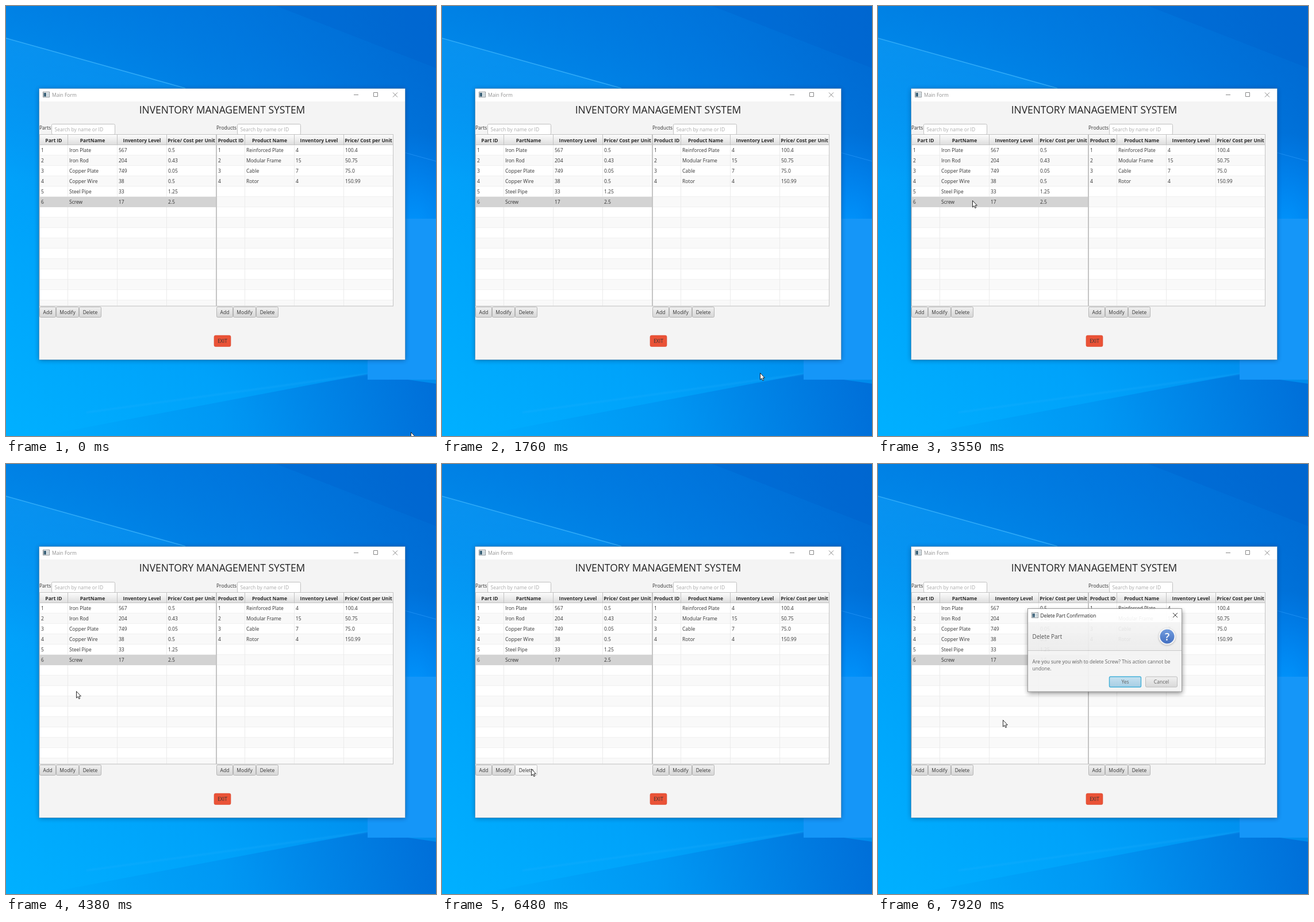
Write an HTML page that moves like this. It is 748 by 748 pixels and loops after 8000 ms.

```html
<!DOCTYPE html>
<html lang="en">
<head>
<meta charset="utf-8">
<title>Inventory</title>
<style>
html, body { margin: 0; width: 100%; height: 100%; overflow: hidden; background: #0090f0; }
svg { display: block; width: 100vw; height: 100vh; }
text { font: 8.5px "Open Sans", "Noto Sans", sans-serif; fill: #333; white-space: pre; }
.head { font-weight: 700; fill: #2c2c2c; }
.mid { text-anchor: middle; }
.title { font-size: 17.43px; fill: #222; }
.hint { fill: #a9a9a9; }
.body { fill: #555; }
</style>
</head>
<body>
<svg id="stage" viewBox="0 0 748 748" xmlns="http://www.w3.org/2000/svg"></svg>
<script>
const LOOP = 8000;
const attrs = o => Object.entries(o).map(([k, v]) => ` ${k}="${v}"`).join('');
const rect = (x, y, w, h, fill, more = {}) =>
  `<rect${attrs({ x, y, width: w, height: h, fill, ...more })}/>`;
const path = (d, stroke, more = {}) =>
  `<path${attrs({ d, fill: 'none', stroke, ...more })}/>`;
const text = (x, y, s, cls = '', more = {}) =>
  `<text${attrs({ x, y, class: cls, ...more })}>${s}</text>`;
const grad = (id, stops, x1 = 0, y1 = 0, x2 = 0, y2 = 1) =>
  `<linearGradient${attrs({ id, x1, y1, x2, y2 })}>` +
  stops.map(([o, c, a = 1]) => `<stop offset="${o}" stop-color="${c}" stop-opacity="${a}"/>`).join('') +
  '</linearGradient>';
const blur = (id, dev) =>
  `<filter id="${id}" x="-20%" y="-20%" width="140%" height="140%"><feGaussianBlur stdDeviation="${dev}"/></filter>`;

const defs = '<defs>' +
  grad('sky', [[0, '#00b0ff'], [.3, '#00a2fa'], [.52, '#008fee'], [.75, '#0079e0'], [1, '#005fc8']], 0, 1, 1, 0) +
  grad('top', [[0, '#0074dc', .55], [1, '#0074dc', 0]]) +
  grad('low', [[0, '#0070dc', 0], [.45, '#0078e0', .25], [1, '#0068d4', .8]], 0, 0, 1, 0) +
  grad('ray', [[0, '#18a8ff', .35], [1, '#0a98f8', 0]]) +
  grad('header', [[0, '#fcfcfc'], [1, '#dcdcdc']]) +
  grad('button', [[0, '#f0f0f0'], [1, '#d6d6d6']]) +
  grad('hover', [[0, '#fbfbfb'], [1, '#eeeeee']]) +
  grad('press', [[0, '#d2d2d2'], [1, '#c2c2c2']]) +
  grad('yes', [[0, '#c2e0f0'], [1, '#a0cae2']]) +
  grad('panel', [[0, '#f5f5f5'], [1, '#ececec']]) +
  grad('disc', [[0, '#6694dc'], [1, '#3565bd']]) +
  '<radialGradient id="glow"><stop offset="0" stop-color="#0098ff" stop-opacity=".9"/>' +
  '<stop offset="1" stop-color="#0088ff" stop-opacity="0"/></radialGradient>' +
  blur('soft', 4) + blur('wide', 6.5) + blur('edge', 1.5) + '</defs>';

function desktop() {
  return rect(0, 0, 748, 748, 'url(#sky)') +
    rect(0, 0, 748, 300, 'url(#top)') +
    path('M470 0L748 108V0Z', 'none', { fill: '#0058c4', 'fill-opacity': .22 }) +
    path('M0 56L312 143V420H0Z', 'none', { fill: 'url(#ray)' }) +
    path('M0 56L312 143', '#48bcff', { 'stroke-width': 1.6, opacity: .65 }) +
    '<ellipse cx="710" cy="390" rx="120" ry="170" fill="url(#glow)"/>' +
    path('M690 254L748 270', '#38a4ff', { opacity: .5 }) +
    path('M630 640L748 657V748H60Z', 'none', { fill: 'url(#low)' }) +
    path('M630 640L140 707', '#2cb4ff', { 'stroke-width': 2, opacity: .35, filter: 'url(#edge)' }) +
    rect(629, 370, 280, 280, '#1596f8');
}

// Small window symbol in a title bar
function appIcon(x, y) {
  return rect(x + .5, y + .5, 11, 9, '#fff', { stroke: '#8c9499' }) +
    rect(x + 1.5, y + 2, 4.5, 6.5, '#3c6278') +
    rect(x + 7, y + 2, 3.5, 6.5, '#c8d4da');
}

const cross = (x, y) => `M${x - 4} ${y - 4}l8 8m0 -8l-8 8`;

function button(x, y, w, h, label, id = '') {
  return rect(x + .5, y + .5, w - 1, h - 1, 'url(#button)', { id, stroke: '#b4b4b4', rx: 2 }) +
    text(x + w / 2, y + h / 2 + 3.2, label, 'mid');
}

function table(x, heads, rows, picked) {
  const cols = [0, 49, 135, 221, 307];
  const top = 242, end = 522;
  let s = rect(x, 224, 308, end - 224, '#fff');
  for (let i = 0; top + i * 18 < end; i++) {
    const y = top + i * 18, h = Math.min(18, end - y);
    s += rect(x, y, 307, h, i === picked ? '#d3d3d3' : i % 2 ? '#f9f9f9' : '#fff');
    if (i !== picked) s += rect(x, y + h - 1, 307, 1, '#f0f0f0');
  }
  s += rect(x, 224, 308, 18, 'url(#header)') + rect(x, 241, 308, 1, '#c6c6c6');
  heads.forEach((label, i) => {
    const c = x + cols[i + 1];
    s += rect(c, 242, 1, end - 242, '#ebebeb') + rect(c, 224, 1, 18, '#c2c2c2');
    s += text(x + (cols[i] + cols[i + 1]) / 2 + .5, 237, label, 'head mid');
  });
  if (picked !== undefined) s += rect(x, top + picked * 18, 307, 18, '#d3d3d3');
  rows.forEach((row, r) => row.forEach((cell, i) => {
    s += text(x + cols[i] + 3, top + 12.3 + r * 18, cell);
  }));
  return s + rect(x + .5, 223.5, 307, 298.5, 'none', { stroke: '#c4c4c4' });
}

function pane(x, label, fieldX, heads, rows, picked, delId) {
  return text(x, 215, label) +
    rect(fieldX + .5, 205.5, 110, 18, '#fff', { stroke: '#c0c0c0', rx: 2 }) +
    text(fieldX + 5.5, 217.8, 'Search by name or ID', 'hint') +
    table(x, heads, rows, picked) +
    button(x, 523, 29, 19, 'Add') + button(x + 29, 523, 40, 19, 'Modify') +
    button(x + 69, 523, 39, 19, 'Delete', delId);
}

function mainWindow() {
  const level = 'Inventory Level', price = 'Price/ Cost per Unit';
  const parts = [
    [1, 'Iron Plate', 567, '0.5'], [2, 'Iron Rod', 204, '0.43'],
    [3, 'Copper Plate', 749, '0.05'], [4, 'Copper Wire', 38, '0.5'],
    [5, 'Steel Pipe', 33, '1.25'], [6, 'Screw', 17, '2.5']
  ];
  const products = [
    [1, 'Reinforced Plate', 4, '100.4'], [2, 'Modular Frame', 15, '50.75'],
    [3, 'Cable', 7, '75.0'], [4, 'Rotor', 4, '150.99']
  ];
  return rect(58, 145, 636, 471, '#001c40', { id: 'shade', filter: 'url(#soft)', opacity: .45 }) +
    rect(60, 148, 638, 474, '#001c40', { id: 'deep', filter: 'url(#wide)', opacity: .5 }) +
    rect(57.5, 143.5, 637, 472, '#f4f4f4', { stroke: '#3a76a8', 'stroke-opacity': .5 }) +
    rect(58, 144, 636, 22, '#fff') + appIcon(64, 149) +
    text(80, 157.7, 'Main Form', '', { id: 'caption' }) +
    path('M605 154.5h8M639.5 150.5h7v7h-7z' + cross(677, 154.5), '#888', { id: 'controls' }) +
    text(376, 187, 'INVENTORY MANAGEMENT SYSTEM', 'title mid') +
    pane(58, 'Parts', 79, ['Part ID', 'PartName', level, price], parts, 5, 'del') +
    pane(366, 'Products', 402, ['Product ID', 'Product Name', level, price], products) +
    rect(362, 573, 29, 19.5, '#ea5337', { rx: 2.5, stroke: '#d8492f', 'stroke-width': .6 }) +
    text(376.5, 585.9, 'EXIT', 'mid');
}

function dialog() {
  return '<g id="dialog">' +
    rect(261, 255, 268, 144, '#000', { filter: 'url(#soft)', opacity: .5 }) +
    rect(260.5, 251.5, 268, 144.5, '#f4f4f4', { stroke: '#929292' }) +
    rect(261, 252, 267, 23, '#fff') + appIcon(267, 258) +
    text(282.5, 266.7, 'Delete Part Confirmation', '', { style: 'font-size:8.35px;fill:#111' }) +
    path(cross(517, 263), '#222') +
    rect(261, 275, 267, 49, 'url(#panel)') + rect(261, 324, 267, 1, '#c6c6c6') +
    text(268.5, 303.8, 'Delete Part', '', { style: 'font-size:9.95px;fill:#444' }) +
    '<circle cx="503" cy="301" r="15" fill="#000" opacity=".22" filter="url(#edge)"/>' +
    '<circle cx="503" cy="300" r="14.5" fill="#f8f8f8"/>' +
    '<circle cx="503" cy="300" r="12.5" fill="url(#disc)"/>' +
    text(503, 306.5, '?', 'mid', { style: 'font-size:18px;font-weight:600;fill:#fff' }) +
    text(268.5, 346.5, 'Are you sure you wish to delete Screw? This action cannot be', 'body') +
    text(268.5, 359.3, 'undone.', 'body') +
    rect(402.5, 370, 55, 18, 'url(#yes)', { stroke: '#35abd6', 'stroke-width': 1.4, rx: 2 }) +
    text(430, 382.2, 'Yes', 'mid body') +
    rect(465.5, 370, 55, 18, 'url(#button)', { stroke: '#b8b8b8', rx: 2 }) +
    text(493, 382.2, 'Cancel', 'mid body') + '</g>';
}

const pointer = path('M.5 .5V12L3.1 9.6L4.9 13.6L6.7 12.8L5 8.9H8.4Z', '#111',
  { id: 'pointer', fill: '#fff', 'stroke-width': .9 });

document.getElementById('stage').innerHTML = defs + desktop() + mainWindow() + dialog() + pointer;

const $ = id => document.getElementById(id);
const set = (id, o) => { for (const k in o) $(id).setAttribute(k, o[k]); };

// Pointer keys: time, x, y
const keys = [
  [0, 704, 741], [830, 655, 687], [1660, 562, 642], [1760, 553, 638], [2490, 388, 593],
  [3320, 193, 375], [3550, 164, 338], [3700, 148, 336], [4150, 123, 383], [4380, 122, 395],
  [4980, 150, 442], [5780, 167, 519], [6130, 167, 519], [6480, 155, 530], [6830, 153, 531],
  [7210, 157, 527], [7340, 160, 520], [7920, 217, 445]
];

const slope = (i, a) => (keys[i + 1][a] - keys[i][a]) / (keys[i + 1][0] - keys[i][0]);

// Monotone tangent, so the path never overshoots a key
function tangent(i, a) {
  if (i === 0) return slope(0, a) * .6;
  if (i === keys.length - 1) return slope(i - 1, a);
  const p = slope(i - 1, a), q = slope(i, a);
  return p * q <= 0 ? 0 : 2 * p * q / (p + q);
}

function along(t, a) {
  const last = keys.length - 1;
  if (t >= keys[last][0]) return keys[last][a];
  let i = 0;
  while (t >= keys[i + 1][0]) i++;
  const h = keys[i + 1][0] - keys[i][0], u = (t - keys[i][0]) / h, v = 1 - u;
  return keys[i][a] * (1 + 2 * u) * v * v + keys[i + 1][a] * (3 - 2 * u) * u * u +
    h * u * v * (v * tangent(i, a) - u * tangent(i + 1, a));
}

function draw(t) {
  const x = Math.round(along(t, 1)), y = Math.round(along(t, 2));
  set('pointer', { transform: `translate(${x} ${y})` });

  const active = t >= 6650 && t < 7210;
  const over = x >= 127 && x < 166 && y >= 523 && y < 542 && t < 7210;
  const held = t >= 6650 && t < 6800;
  set('del', {
    fill: `url(#${held ? 'press' : over ? 'hover' : 'button'})`,
    stroke: active ? '#039ed3' : over ? '#c4c4c4' : '#b4b4b4'
  });
  set('deep', { visibility: active ? 'visible' : 'hidden' });
  set('caption', { style: `fill:${active ? '#000' : '#8e8e8e'}` });
  set('controls', { stroke: active ? '#111' : '#888' });

  const u = Math.min(1, Math.max(0, (t - 7340) / 580));
  const fade = t < 7270 ? 0 : t < 7340 ? .13 * (t - 7270) / 70 : .13 + .79 * u;
  const size = .966 + .034 * u;
  set('dialog', {
    opacity: fade,
    transform: `translate(395 324) scale(${size}) translate(-395 -324)`
  });
}

function tick() {
  draw(performance.now() % LOOP);
  requestAnimationFrame(tick);
}
tick();
</script>
</body>
</html>
```
